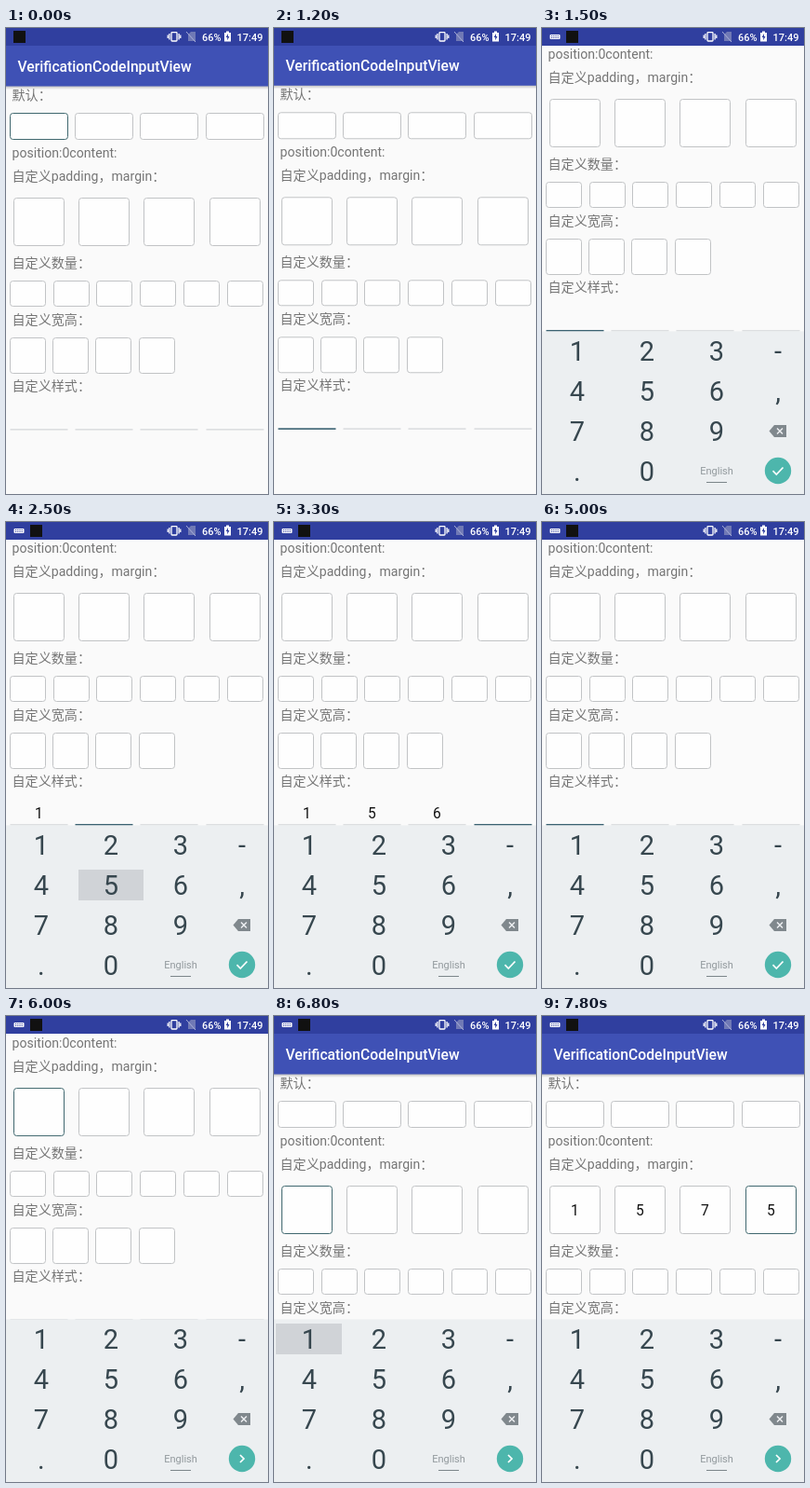
Animation of 282 by 500 pixels, one loop 8000 ms. Source, as an HTML page:

```html
<!DOCTYPE html>
<html lang="zh-CN">
<head>
<meta charset="utf-8">
<style>
  html, body { margin: 0; height: 100%; overflow: hidden; background: #fafafa; }
  svg { display: block; width: 100vw; height: 100vh; }
  text { font-family: Roboto, "Noto Sans CJK SC", sans-serif; }
  .label { font-size: 14.1px; fill: #757575; }
  .digit { font-size: 15.6px; fill: #111; text-anchor: middle; }
  .key { font-size: 29px; fill: #37474f; text-anchor: middle; }
  .status { font-size: 11px; font-weight: 500; fill: #fff; }
  .box { fill: #fefefe; stroke: #c1c3c5; }
  .line { fill: #dcdee0; }
  .box.focus { stroke: #40686f; }
  .line.focus { fill: #3b6272; }
</style>
</head>
<body>
<svg viewBox="0 0 282 500">
  <rect width="282" height="500" fill="#fafafa"/>
  <g id="page">
    <defs>
      <linearGradient id="shade" x2="0" y2="1">
        <stop stop-color="#000" stop-opacity=".25"/>
        <stop offset="1" stop-color="#000" stop-opacity="0"/>
      </linearGradient>
    </defs>
    <rect y="62" width="282" height="4" fill="url(#shade)"/>
    <rect y="19" width="282" height="43.5" fill="#3f51b5"/>
    <text x="12.5" y="46.5" font-size="15.7" font-weight="500" fill="#fff">VerificationCodeInputView</text>
    <text class="label" x="6.5" y="77">默认：</text>
    <text class="label" x="6.5" y="138.5">position:0content:</text>
    <text class="label" x="6.5" y="163.6">自定义padding，margin：</text>
    <text class="label" x="6.5" y="256.6">自定义数量：</text>
    <text class="label" x="6.5" y="317.6">自定义宽高：</text>
    <text class="label" x="6.5" y="389">自定义样式：</text>
    <g id="fields"></g>
  </g>

  <g id="keyboard">
    <rect y="325.5" width="282" height="176" fill="#eceff1"/>
    <rect id="pressed" height="33" fill="#d0d3d7"/>
    <g id="keys"></g>
    <path d="M244.5 432.5l5.5-6.5h13v13h-13z" fill="#80888d"/>
    <path d="M253 429.5l6 6m0-6l-6 6" stroke="#eceff1" stroke-width="1.5"/>
    <text x="188" y="479" font-size="11" fill="#92999d" text-anchor="middle">English</text>
    <path d="M177 487.5h22" stroke="#7c858a"/>
    <circle cx="254" cy="475" r="14.2" fill="#4db6ac"/>
    <path id="action" fill="none" stroke="#fff" stroke-width="1.7"/>
  </g>

  <rect width="282" height="19" fill="#303f9f"/>
  <g id="imeIcon">
    <rect x="8.5" y="7" width="11" height="5" rx="1" fill="#fff"/>
    <path d="M10 8.5h8M10 10.5h8" stroke="#303f9f" stroke-dasharray="1 .8"/>
  </g>
  <rect id="appIcon" y="3" width="13" height="13" fill="#111"/>
  <g fill="none" stroke="#fff" stroke-width="1.3">
    <rect x="178" y="4.6" width="6" height="9.4" rx=".8"/>
    <path d="M175.9 6v6.5M174.2 7.5v3.5M186.1 6v6.5M187.8 7.5v3.5"/>
  </g>
  <path d="M196 7l3-3h5v10h-8z" fill="#7079b5"/>
  <path d="M194 4l10 11" stroke="#aab0d8"/>
  <text class="status" x="211" y="13.5">66%</text>
  <path d="M235 5h2v-1.5h3v1.5h2v9.5h-7z" fill="#fff"/>
  <path d="M239 6l-2.3 4h1.5v3.3l2.3-4.2h-1.5z" fill="#303f9f"/>
  <text class="status" x="276.5" y="13.5" text-anchor="end">17:49</text>
</svg>

<script>
const LOOP = 8000, PAN = 106, KEYBOARD_HEIGHT = 176;
const $ = id => document.getElementById(id);

// Field rows; a row without height is a set of underlines.
const rows = [
  { count: 4, x: 4, y: 91.5, w: 62, h: 28, pitch: 70.4 },
  { count: 4, x: 8, y: 182.5, w: 54, h: 51, pitch: 70.4, textY: 214 },
  { count: 6, x: 4, y: 271.5, w: 38, h: 27, pitch: 46.9 },
  { count: 4, x: 4, y: 332.5, w: 38, h: 38, pitch: 46.4 },
  { count: 4, x: 4, y: 430, w: 62, pitch: 70.4, textY: 423.5 }
];

const columns = [[2, 71, 37.8], [78, 70, 113], [153, 70, 188], [228, 52, 254]]; // left, width, centre
const keypad = ["123-", "456,", "789<", ".0  "];

// Each press: start, end, key. The key takes effect on release.
const sessions = [
  { row: 4, start: 1200, presses: [
    [2200, 2400, "1"], [2500, 2700, "5"], [3200, 3300, "6"], [3500, 3600, "7"],
    [4000, 4100, "<"], [4400, 4500, "<"], [4600, 4800, "<"], [4900, 5000, "<"]] },
  { row: 1, start: 6000, presses: [
    [6800, 6900, "1"], [7100, 7200, "5"], [7400, 7500, "7"], [7700, 7800, "5"]] }
];

function add(parent, tag, attrs) {
  const el = document.createElementNS("http://www.w3.org/2000/svg", tag);
  for (const name in attrs) el.setAttribute(name, attrs[name]);
  return parent.appendChild(el);
}

for (const row of rows) {
  row.cells = Array.from({ length: row.count }, (_, i) => {
    const x = Math.round(row.x + i * row.pitch - 0.4) + 0.5; // crisp borders
    const shape = add($("fields"), "rect",
      { x, y: row.y, width: row.w, height: row.h || 1.6, rx: row.h ? 3 : 0 });
    const digit = add($("fields"), "text",
      { class: "digit", x: x + row.w / 2, y: row.textY || 0 });
    return { shape, digit };
  });
}

keypad.forEach((line, r) => [...line].forEach((char, c) => {
  if (char === " " || char === "<") return;
  add($("keys"), "text", { class: "key", x: columns[c][2], y: 357.3 + r * 43 }).textContent = char;
}));

function ease(t, start, end) {
  const p = Math.min(1, Math.max(0, (t - start) / (end - start)));
  return 1 - (1 - p) ** 2;
}

function render(t) {
  const session = sessions.findLast(s => t >= s.start);
  const activeRow = session ? session.row : 0;
  let typed = "", held = null;
  for (const [down, up, key] of session ? session.presses : []) {
    if (t >= up) typed = key === "<" ? typed.slice(0, -1) : typed + key;
    else if (t >= down) held = key;
  }

  rows.forEach((row, r) => row.cells.forEach(({ shape, digit }, i) => {
    const active = r === activeRow;
    const focused = active && i === Math.min(typed.length, row.count - 1);
    shape.setAttribute("class", (row.h ? "box" : "line") + (focused ? " focus" : ""));
    digit.textContent = active ? typed[i] || "" : "";
  }));

  const shown = ease(t, 1200, 1500);
  const pan = PAN * (shown - ease(t, 6000, 6200));
  $("page").setAttribute("transform", `translate(0 ${-pan})`);
  $("keyboard").setAttribute("transform", `translate(0 ${KEYBOARD_HEIGHT * (1 - shown)})`);

  const keyRow = held ? keypad.findIndex(line => line.includes(held)) : 0;
  const [left, width] = columns[held ? keypad[keyRow].indexOf(held) : 0];
  $("pressed").setAttribute("x", left);
  $("pressed").setAttribute("y", 330 + keyRow * 43);
  $("pressed").setAttribute("width", held ? width : 0);

  $("action").setAttribute("d", activeRow === 1 ? "M252 471l4 4-4 4" : "M248.5 475.2l3.8 3.8 7.2-7.5");
  $("imeIcon").setAttribute("opacity", t >= 1300 ? 1 : 0);
  $("appIcon").setAttribute("x", t >= 1300 ? 26 : 8);
}

function tick() {
  render(performance.now() % LOOP);
  requestAnimationFrame(tick);
}
tick();
</script>
</body>
</html>
```
